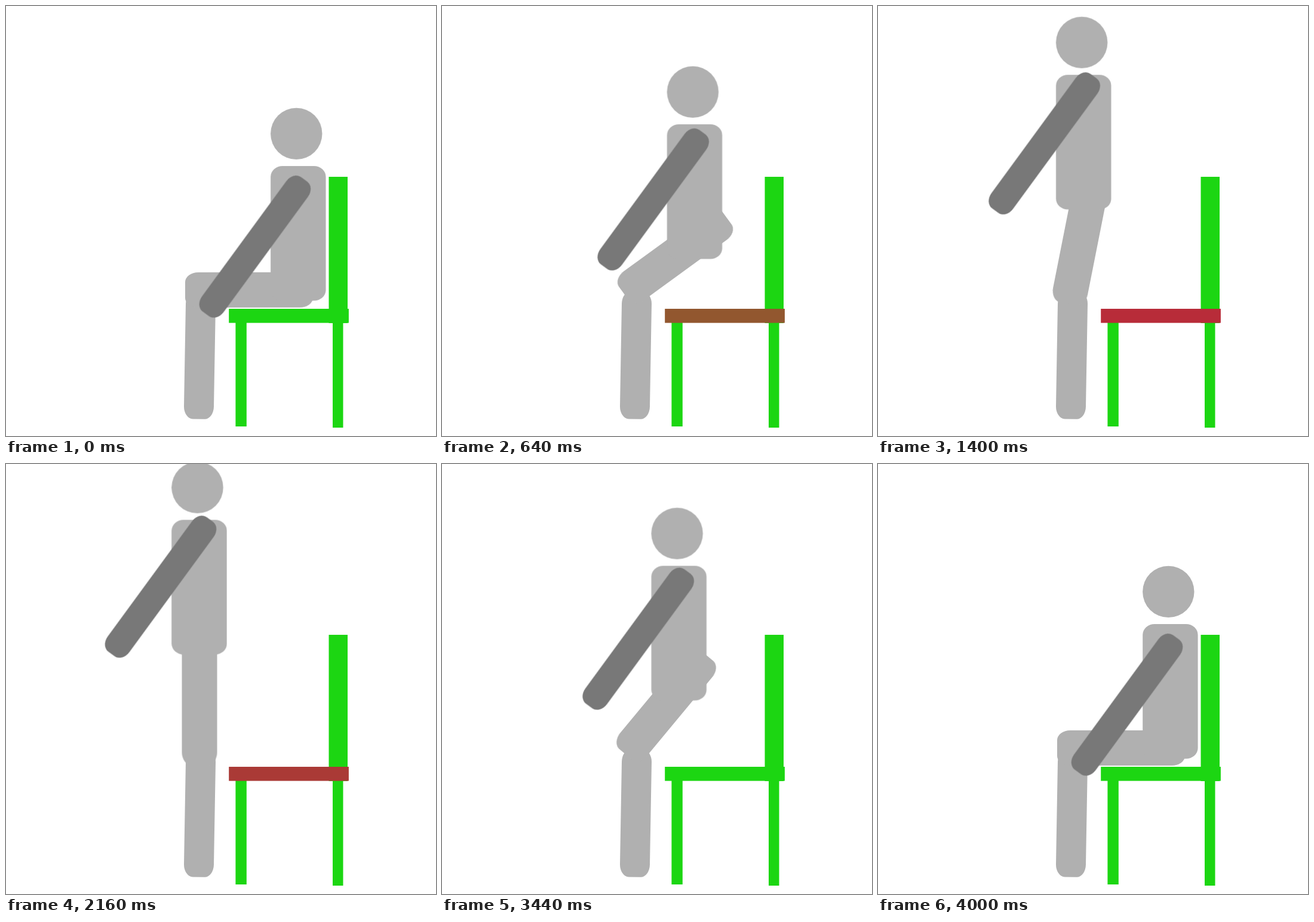
Animation, 720 px wide and 720 px high, one loop 5000 ms. Source, as an HTML page:

```html
<!DOCTYPE html>
<html lang="en">
<head>
<meta charset="utf-8">
<title>Sit to stand</title>
<style>
  html, body { margin: 0; width: 100%; height: 100%; overflow: hidden; background: #fff; }
  svg { display: block; width: 100%; height: 100%; }

  .body { fill: #b0b0b0; }
  .arm { fill: #787878; }
  .chair { fill: #1cd612; }

  .move { animation: 5s linear infinite; }
  .trunk { animation-name: trunk; }
  .thigh { animation-name: thigh; }
  .reach { animation-name: reach; }
  .seat { animation-name: seat; }

  /* rise 0-1.6 s, stand until 3 s, sit down by 4 s */
  @keyframes trunk {
    0%, 80%, 100% { transform: translate(0, 0); }
    32%, 60% { transform: translate(-165.8px, -174.5px); }
  }
  @keyframes thigh {
    0%, 80%, 100% { transform: translate(0, 0) rotate(0deg); }
    32%, 60% { transform: translate(53.5px, -.5px) rotate(-90deg); }
  }
  @keyframes reach {
    0%, 80%, 100% { transform: translate(0, 0); }
    32%, 60% { transform: translate(-158px, -197.5px); }
  }
  @keyframes seat {
    0%, 60%, 100% { fill: #1cd612; }
    20% { fill: #d4103f; }
    32%, 52% { fill: #aa3a36; }
  }
</style>
</head>
<body>
<svg viewBox="0 0 720 720">
  <g class="chair">
    <rect x="540.5" y="286" width="31.5" height="245"/>
    <rect x="384.4" y="530" width="18.4" height="174"/>
    <rect x="547" y="530" width="17.5" height="176"/>
    <rect class="move seat" x="373.2" y="507" width="200.7" height="23.6"/>
  </g>
  <g class="body">
    <rect x="299.5" y="477.6" width="50" height="214" rx="15" ry="21" transform="rotate(1 324.5 584.6)"/>
    <g transform="translate(300 505)">
      <rect class="move thigh" y="-59" width="214" height="59" rx="22" ry="16"/>
    </g>
    <g class="move trunk">
      <circle cx="486.3" cy="213.9" r="43.2"/>
      <rect x="443.2" y="268" width="92.4" height="225.6" rx="20" ry="18"/>
    </g>
  </g>
  <g class="move reach">
    <rect class="arm" x="394.6" y="263.4" width="44.8" height="279.2" rx="16" ry="20" transform="rotate(36.2 417 403)"/>
  </g>
</svg>
</body>
</html>
```
